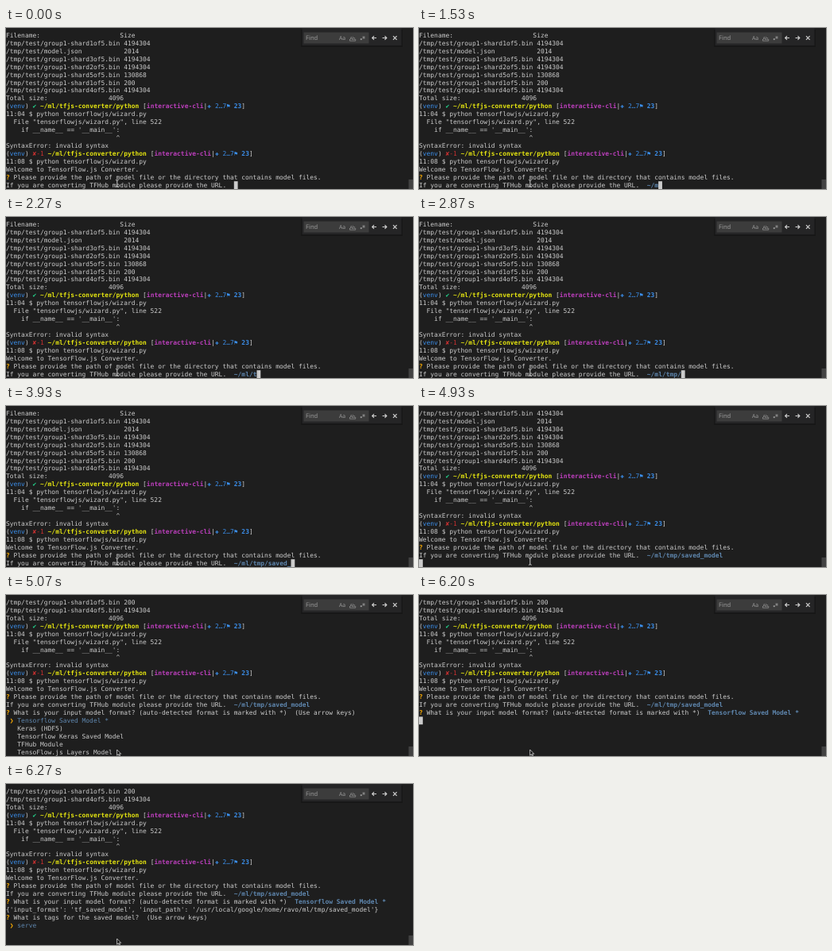
These frames come from a looping animation (512x203 px, 8 s). An HTML page:

```html
<!DOCTYPE html>
<html lang="en">
<head>
<meta charset="utf-8">
<title>Converter wizard</title>
<style>
  html, body { margin: 0; width: 100%; height: 100%; overflow: hidden; background: #1e1e1e; }
  svg { display: block; width: 512px; height: 203px; }
  text { white-space: pre; text-rendering: geometricPrecision; }
  #rows text { font: 7.94px "DejaVu Sans Mono", "DejaVu Sans", monospace; fill: #ccc; }
  #rows .b { font-weight: bold; }
  .ui { font-family: "Noto Sans", sans-serif; fill: #9a9a9a; }
</style>
</head>
<body>
<svg viewBox="0 0 512 203" xmlns="http://www.w3.org/2000/svg">
  <rect width="512" height="203" fill="#1e1e1e"/>
  <g id="rows"></g>
  <rect id="caret" width="4.8" height="9.8" fill="#ccc"/>

  <rect x="506.5" y="191" width="5.5" height="12" fill="#424242"/>

  <g id="find">
    <rect x="371" y="2" width="128" height="22" fill="#000" opacity=".25"/>
    <rect x="372.5" y="0" width="125" height="22" fill="#252526"/>
    <rect x="374.5" y="5.5" width="82" height="14" fill="#3c3c3c"/>
    <text class="ui" x="377" y="15.4" font-size="7.6">Find</text>
    <text class="ui" x="419" y="15.2" font-size="6.8">Aa</text>
    <text class="ui" x="432.5" y="14.6" font-size="5.6">Ab</text>
    <path d="M432.5 14v2.2h7.2v-2.2" fill="none" stroke="#9a9a9a" stroke-width=".7"/>
    <rect x="445.8" y="13.2" width="1.9" height="1.9" fill="#9a9a9a"/>
    <path d="M450 10v4M448.3 11l3.4 2M448.3 13l3.4-2" stroke="#9a9a9a" stroke-width=".7"/>
    <g fill="none" stroke="#d0d0d0" stroke-width="1.2">
      <path d="M466 12.5h-5M463 10.2l-2.3 2.3l2.3 2.3"/>
      <path d="M473.5 12.5h5M476.5 10.2l2.3 2.3l-2.3 2.3"/>
      <path d="M487 10.2l4.6 4.6M491.6 10.2l-4.6 4.6"/>
    </g>
  </g>

  <path id="beam" d="M138 191.6q1.8 0 1.8 1.2q0-1.2 1.8-1.2M139.8 192.8v6.4M138 200.4q1.8 0 1.8-1.2q0 1.2 1.8 1.2" fill="none" stroke="#ddd" stroke-width=".9"/>
  <path id="arrow" d="M139.6 195v7.2l1.7-1.5l1.1 2.4l1.1-.5l-1.1-2.3h2.3z" fill="#111" stroke="#eee" stroke-width=".7"/>
</svg>
<script>
const NS = "http://www.w3.org/2000/svg";
const LOOP = 8000, COL = 4.78, ROW = 9.95, TOP = 4.2, ROWS = 20;
const $ = id => document.getElementById(id);

const INK = {
  blue: "#3b8eea", green: "#23d18b", red: "#cd3131", yellow: "#e5e510",
  magenta: "#bc3fbc", orange: "#ffaf00", steel: "#5f87af"
};

// A line is a list of spans: plain text or [text, colour, bold].
const q = ["?", "orange", true];
const pick = text => [[" ❯", "orange", true], [" " + text, "steel"]];
const shard = (n, size) => [`/tmp/test/group1-shard${n}of5.bin ${size}`];
const prompt = status => [
  "(", ["venv", "blue"], ") ", status, " ",
  ["~/ml/tfjs-converter/python", "yellow", true], " [",
  ["interactive-cli", "magenta", true], "|",
  ["✚ 2", "blue"], ["…7⚑ ", "blue"], ["23", "blue", true], "]"
];

const HISTORY = [
  ["Filename:".padEnd(30) + "Size"],
  shard(1, 4194304),
  ["/tmp/test/model.json".padEnd(31) + "2014"],
  shard(3, 4194304),
  shard(2, 4194304),
  shard(5, 130868),
  shard(1, 200),
  shard(4, 4194304),
  ["Total size:".padEnd(27) + "4096"],
  prompt(["✔", "green", true]),
  ["11:04 $ python tensorflowjs/wizard.py"],
  ['  File "tensorflowjs/wizard.py", line 522'],
  ["    if __name__ == '__main__':"],
  [" ".repeat(29) + "^"],
  ["SyntaxError: invalid syntax"],
  prompt(["✘-1", "red"]),
  ["11:08 $ python tensorflowjs/wizard.py"],
  ["Welcome to TensorFlow.js Converter."],
  [q, " Please provide the path of model file or the directory that contains model files."]
];

const ASK_PATH = "If you are converting TFHub module please provide the URL.  ";
const PATH = "~/ml/tmp/saved_model";
const KEYS = [930, 1200, 1530, 1730, 1930, 2270, 2400, 2600, 2870, 3070,
  3270, 3400, 3530, 3730, 3930, 4200, 4400, 4530, 4600, 4670];
const ENTER = 4930, LIST = 5000, POINTER = 5070, CHOSEN = 6200, TAGS = 6270;

const ASK_FORMAT = " What is your input model format? (auto-detected format is marked with *)  ";
const FORMAT = "Tensorflow Saved Model *";
const HINT = "(Use arrow keys)";
const FORMATS = [
  [q, ASK_FORMAT + HINT],
  pick(FORMAT),
  ...["Keras (HDF5)", "Tensorflow Keras Saved Model", "TFHub Module",
    "TensoFlow.js Layers Model"].map(s => ["   " + s])
];
const ANSWER = [q, ASK_FORMAT, [FORMAT, "steel", true]];
const RESULT = [
  ANSWER,
  ["{'input_format': 'tf_saved_model', 'input_path': '/usr/local/google/home/ravo/ml/tmp/saved_model'}"],
  [q, " What is tags for the saved model?  " + HINT],
  pick("serve")
];

function drawLine(spans, row) {
  const line = document.createElementNS(NS, "text");
  line.setAttribute("y", TOP + row * ROW + 7.6);
  let col = 0;
  for (const span of spans) {
    const [text, ink, bold] = [].concat(span);
    const part = document.createElementNS(NS, "tspan");
    part.setAttribute("x", col * COL);
    part.textContent = text;
    if (ink) part.style.fill = INK[ink];
    if (bold) part.classList.add("b");
    line.append(part);
    col += text.length;
  }
  return line;
}

function stateAt(t) {
  const typed = KEYS.filter(k => k <= t).length;
  const lines = [...HISTORY, [ASK_PATH, [PATH.slice(0, typed), "steel", true]]];
  if (t < ENTER) return { lines, first: 0, caret: [ASK_PATH.length + typed, 19] };
  if (t < LIST) return { lines, first: 1, caret: [0, 19] };
  if (t < CHOSEN) return { lines: [...lines, ...FORMATS], first: 6 };
  if (t < TAGS) return { lines: [...lines, ANSWER], first: 6, caret: [0, 15] };
  return { lines: [...lines, ...RESULT], first: 6 };
}

let shown = "";
function render(t) {
  const { lines, first, caret } = stateAt(t);
  const key = JSON.stringify([lines.slice(first), caret]);
  if (key !== shown) {
    shown = key;
    $("rows").replaceChildren(...lines.slice(first, first + ROWS).map(drawLine));
    $("caret").style.display = caret ? "" : "none";
    if (caret) {
      $("caret").setAttribute("x", caret[0] * COL);
      $("caret").setAttribute("y", TOP + caret[1] * ROW);
    }
  }
  $("beam").style.display = t < POINTER ? "" : "none";
  $("arrow").style.display = t < POINTER ? "none" : "";
}

const start = performance.now();
function tick() {
  render((performance.now() - start) % LOOP);
  requestAnimationFrame(tick);
}
tick();
</script>
</body>
</html>
```
